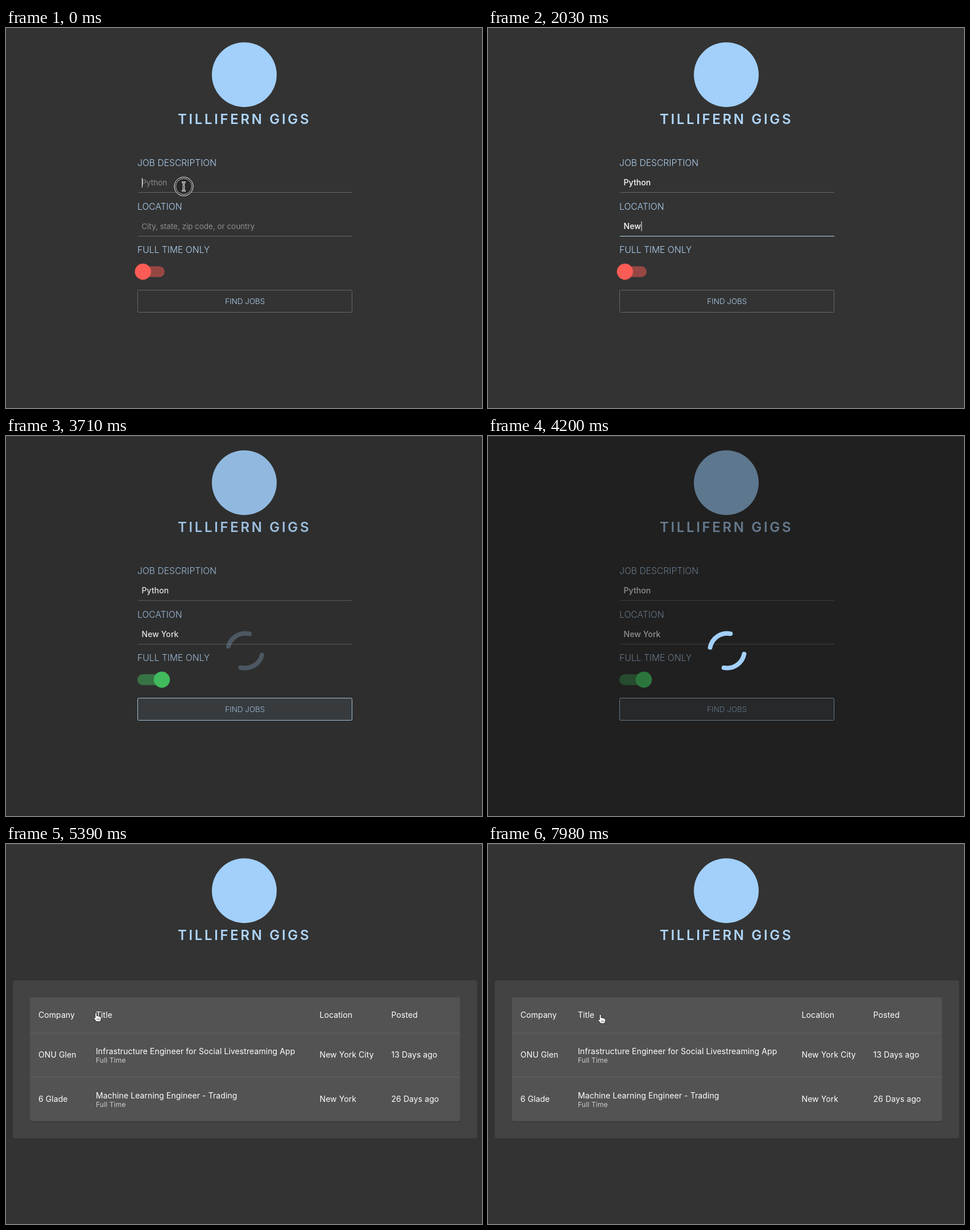
Animation, 837 px wide and 669 px high, one loop 8000 ms. Source, as an HTML page:

```html
<!DOCTYPE html>
<html lang="en">
<head>
<meta charset="utf-8">
<title>Job search</title>
<style>
html, body { margin: 0; width: 100%; height: 100%; overflow: hidden; background: #333; }
svg { display: block; width: 100vw; height: 100vh; }
text { font: 400 14px Inter, "Open Sans", sans-serif; letter-spacing: .08px; fill: #fff; white-space: pre; }
.brand { font-size: 24px; font-weight: 600; letter-spacing: 3.65px; fill: #b0d6fa; }
.label { font-size: 15.7px; font-weight: 300; letter-spacing: 0; fill: #b0d2f2; }
.button { font-size: 13.4px; font-weight: 300; letter-spacing: 0; fill: #b0d2f2; text-anchor: middle; }
.hint { font-size: 13.6px; letter-spacing: -.08px; fill: #8c8c8c; }
.typed { font-weight: 500; }
.sub { font-size: 12.2px; fill: #ccc; }
</style>
</head>
<body>
<svg viewBox="0 0 837 669">
  <rect width="837" height="669" fill="#333"/>
  <circle cx="419" cy="82.2" r="57" fill="#a2d0fa"/>
  <text class="brand" x="302" y="169">TILLIFERN GIGS</text>

  <g id="form">
    <text class="label" x="231" y="243">JOB DESCRIPTION</text>
    <text class="hint" id="jobHint" x="238.5" y="277">Python</text>
    <text class="typed" id="job" x="238.5" y="277"></text>
    <path id="jobLine" d="M232 289.5H609"/>
    <text class="label" x="231" y="319.5">LOCATION</text>
    <text class="hint" id="placeHint" x="238.5" y="353.5">City, state, zip code, or country</text>
    <text class="typed" id="place" x="238.5" y="353.5"></text>
    <path id="placeLine" d="M232 366.5H609"/>
    <text class="label" x="231" y="396">FULL TIME ONLY</text>
    <rect id="track" x="231" y="419.5" width="48" height="19" rx="9.5" opacity=".5"/>
    <circle id="knob" cy="429" r="14.2"/>
    <rect id="button" x="231.5" y="461.5" width="377" height="39" rx="2"/>
    <text class="button" x="420.3" y="486">FIND JOBS</text>
    <path id="caret" stroke="#fff"/>
  </g>

  <g id="loading">
    <rect id="shade" width="837" height="669" fill="#0b0b0b"/>
    <path id="spinner" d="M30.5 0A30.5 30.5 0 0 1 0 30.5M-30.5 0A30.5 30.5 0 0 1 0 -30.5"
      fill="none" stroke="#a2d0fa" stroke-width="8" stroke-linecap="round"/>
  </g>

  <g id="results">
    <rect x="12" y="240" width="816.5" height="278" rx="4" fill="#434343"/>
    <rect x="42" y="272" width="757" height="217.5" rx="4" fill="#383838"/>
    <rect x="42" y="270" width="756.5" height="218" rx="4" fill="#535353"/>
    <path d="M42 333H798M42 410.5H798" stroke="#636363"/>
    <g id="cells"></g>
    <path id="arrow" d="M0 5.5V-4.5M-4.8 .2L0 -4.6L4.8 .2" fill="none" stroke="#fff" stroke-width="2.2"/>
  </g>

  <path id="topLine" d="M0 .5H837" stroke="#454545"/>
  <g id="ring" fill="none" stroke="#fff">
    <circle r="16.5" fill="#222" fill-opacity=".6"/>
    <circle r="14" stroke-opacity=".7"/>
  </g>
  <g id="beam" transform="translate(312.5 279)" fill="none">
    <path d="M-3.5 -7.5Q0 -7.5 0 -5V5Q0 7.5 -3.5 7.5M3.5 -7.5Q0 -7.5 0 -5V5Q0 7.5 3.5 7.5M-2 1H2" stroke="#fff" stroke-width="3"/>
    <path d="M-3.5 -7.5Q0 -7.5 0 -5V5Q0 7.5 -3.5 7.5M3.5 -7.5Q0 -7.5 0 -5V5Q0 7.5 3.5 7.5M-2 1H2" stroke="#222"/>
  </g>
  <g id="hand" stroke-linejoin="round">
    <path d="M-1.5 1Q-1.5 -.5 0 -.5T1.5 1V5.5Q3.5 4.7 4.3 6Q6 5.3 6.8 6.8Q9 6.2 9 8.5V11L7.7 15.5H.5L-3.8 9.8Q-4.4 8 -2.7 8.2L-1.5 9.4Z" fill="#fff" stroke="#222"/>
    <path d="M2 10V13M4 10V13M6 10V13" stroke="#444" stroke-width=".8"/>
  </g>
</svg>

<script>
const LOOP = 8000, STEP = 70;
const el = {};
document.querySelectorAll('[id]').forEach(node => el[node.id] = node);

const set = (node, attrs) => {
  for (const name in attrs) node.setAttribute(name, attrs[name]);
};
const show = (node, visible) => node.style.display = visible ? '' : 'none';
const ramp = (t, from, to) => Math.min(1, Math.max(0, (t - from) / (to - from)));
const ease = p => p * p * (3 - 2 * p);
const mix = (a, b, p) => a + (b - a) * p;
const blend = (a, b, p) => `rgb(${a.map((v, i) => mix(v, b[i], p))})`;
const typed = (word, times, t) => word.slice(0, times.filter(at => at <= t).length);

const GREY = [102, 102, 102], BLUE = [180, 217, 240];
const RED = [251, 92, 85], GREEN = [72, 207, 104];
const JOB_KEYS = [560, 630, 770, 840, 910, 980];
const PLACE_KEYS = [1750, 1820, 1960, 2100, 2310, 2380, 2450, 2520];
const TAB_PLACE = 1330, TAB_TOGGLE = 2800, FLIP = 3080, TAB_BUTTON = 3430;
const SUBMIT = 3710, LOADED = 4270;
const SORT_UP = 5810, SORT_DOWN = 6440, SORT_OFF = 7000;
const CLICKS = [0, SORT_UP, SORT_DOWN, SORT_OFF];
const JOBS = [
  ['ONU Glen', 'Infrastructure Engineer for Social Livestreaming App', 'New York City', '13 Days ago'],
  ['6 Glade', 'Machine Learning Engineer - Trading', 'New York', '26 Days ago']
];

function drawForm(t) {
  const job = typed('Python', JOB_KEYS, t), place = typed('New York', PLACE_KEYS, t);
  el.job.textContent = job;
  el.place.textContent = place;
  show(el.jobHint, !job);
  show(el.placeHint, !place);

  const jobFocus = ramp(t, 0, 210) - ramp(t, TAB_PLACE, TAB_PLACE + 210);
  const placeFocus = ramp(t, TAB_PLACE, TAB_PLACE + 210) - ramp(t, TAB_TOGGLE, TAB_TOGGLE + 210);
  set(el.jobLine, { stroke: blend(GREY, BLUE, jobFocus) });
  set(el.placeLine, { stroke: blend(GREY, BLUE, placeFocus) });

  const [input, y] = t < TAB_PLACE ? [el.job, 264] : [el.place, 340.5];
  const x = 239.5 + input.getComputedTextLength();
  set(el.caret, { d: `M${x} ${y}v17` });
  show(el.caret, t < TAB_TOGGLE);

  const on = ease(ramp(t, FLIP, FLIP + 280)), color = blend(RED, GREEN, on);
  set(el.knob, { cx: mix(240.8, 274, on), fill: color });
  set(el.track, { fill: color });
  set(el.button, {
    stroke: blend(GREY, BLUE, ramp(t, TAB_BUTTON, TAB_BUTTON + 210)),
    fill: t < SUBMIT ? 'none' : 'rgba(162,208,250,.09)'
  });
}

function drawLoading(t) {
  const fade = ramp(t, SUBMIT - STEP, SUBMIT + 210);
  set(el.shade, { opacity: .45 * fade });
  set(el.spinner, {
    opacity: fade,
    transform: `translate(420.5 378) rotate(${11 + (t - 4200) * .36})`
  });
}

function drawResults(t) {
  const sorted = t >= SORT_UP && t < SORT_OFF, up = sorted && t < SORT_DOWN;
  const columns = sorted ? [57, 168.5, 555, 679.5] : [57, 158, 551.5, 677.5];
  const cell = (text, column, y, kind = '') =>
    `<text class="${kind}" x="${columns[column]}" y="${y}">${text}</text>`;
  const header = ['Company', 'Title', 'Location', 'Posted'].map((name, i) => cell(name, i, 306));
  const rows = (up ? [...JOBS].reverse() : JOBS).map((job, row) => {
    const y = 376 + row * 77.5;
    return job.map((text, i) => cell(text, i, i === 1 ? y - 6 : y)).join('') +
      cell('Full Time', 1, y + 9, 'sub');
  });
  el.cells.innerHTML = header.concat(rows).join('');
  show(el.arrow, sorted);
  set(el.arrow, { transform: `translate(130.5 301.5) scale(1 ${up ? 1 : -1})` });
}

function drawPointer(t) {
  const arrive = ease(ramp(t, 4830, 5670)), leave = ease(ramp(t, 7350, 7980));
  const x = mix(mix(312, 104.5, arrive), 197.5, leave);
  const y = mix(mix(279, 303.5, arrive), 300.5, leave);
  show(el.beam, t < JOB_KEYS[0]);
  show(el.hand, t >= 4830);
  set(el.hand, { transform: `translate(${x} ${y})` });

  const click = CLICKS.filter(at => at <= t).pop();
  const center = click ? `${x} ${y}` : '312.5 279';
  set(el.ring, { transform: `translate(${center})`, opacity: 1 - ramp(t, click, click + 280) });
}

function draw(t) {
  const loaded = t >= LOADED;
  show(el.form, !loaded);
  show(el.loading, t >= SUBMIT && !loaded);
  show(el.results, loaded);
  show(el.topLine, t >= SUBMIT);
  if (loaded) drawResults(t);
  else {
    drawForm(t);
    drawLoading(t);
  }
  drawPointer(t);
}

const start = performance.now();
function tick() {
  const t = (performance.now() - start) % LOOP;
  draw(Math.floor(t / STEP) * STEP);
  requestAnimationFrame(tick);
}
tick();
</script>
</body>
</html>
```
